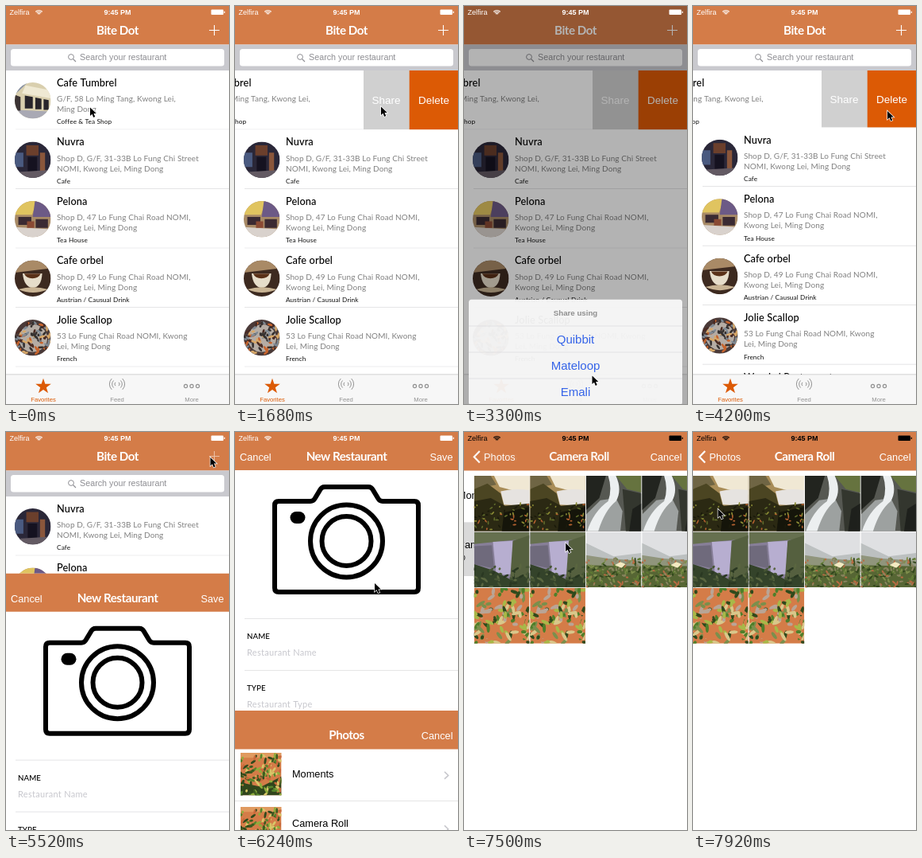
Write an HTML page with a canvas that moves like this. It is 281x500 px and loops after 8 s.

```html
<!DOCTYPE html>
<html lang="en">
<head>
<meta charset="utf-8">
<title>Restaurant list</title>
<style>
  html, body { margin: 0; width: 100%; height: 100%; overflow: hidden; background: #fff; }
  canvas { display: block; width: 281px; height: 500px; }
</style>
</head>
<body>
<canvas id="stage"></canvas>
<script>
const W = 281, H = 500, LOOP = 8000, STEP = 60;
const ROW = 74.5, LIST_TOP = 81, OPEN = 119;
const ORANGE = '#d47c48', ACCENT = '#dc5a05', LINE = '#dcdcde';
const SANS = '"Liberation Sans", sans-serif', LATO = 'Lato, sans-serif';

const canvas = document.getElementById('stage');
const g = canvas.getContext('2d');
const dpr = window.devicePixelRatio || 1;
canvas.width = W * dpr;
canvas.height = H * dpr;

const rows = [
  ['Cafe Tumbrel', 'G/F, 58 Lo Ming Tang, Kwong Lei,', 'Ming Dong', 'Coffee & Tea Shop', 'house'],
  ['Nuvra', 'Shop D, G/F, 31-33B Lo Fung Chi Street', 'NOMI, Kwong Lei, Ming Dong', 'Cafe', 'alley'],
  ['Pelona', 'Shop D, 47 Lo Fung Chai Road NOMI,', 'Kwong Lei, Ming Dong', 'Tea House', 'market'],
  ['Cafe orbel', 'Shop D, 49 Lo Fung Chai Road NOMI,', 'Kwong Lei, Ming Dong', 'Austrian / Causual Drink', 'cup'],
  ['Jolie Scallop', '53 Lo Fung Chai Road NOMI, Kwong', 'Lei, Ming Dong', 'French', 'plate'],
  ['Wun Lai Restaurant', 'Shop J, 61 Mei Song Road NOMI,', 'Kwong Lei, Ming Dong', 'Bakery', 'bread']
];

// Shapes live in a 100 x 100 box; leaves: count, top, bottom, size, colours.
const scenes = {
  house: { bg: '#d9cfae', shapes: [['#8791a6', 'M0 0H36L0 34Z'], ['#efe9d3', 'M30 8L100 22V44L20 30Z'],
    ['#27242a', 'M28 36L50 40V72H28ZM57 42L74 45V74H57ZM80 46L94 49V76H80Z'], ['#a9a9b4', 'M0 76L100 80V100H0Z'], ['#3c3434', 'M0 34L16 40V78H0Z']] },
  alley: { bg: '#2a2738', shapes: [['#4a5a80', 'M0 30H24V70H0Z'], ['#6b3f2c', 'M32 10H66V38H32Z'],
    ['#151220', 'M36 42H62V92H36Z'], ['#8a563b', 'M70 30H84V86H70Z'], ['#635a63', 'M0 84L100 78V100H0Z']] },
  market: { bg: '#a88a66', shapes: [['#e0c460', 'M0 0H62L48 38H0Z'], ['#6c5a86', 'M56 0H100V44H50Z'],
    ['#3a2a32', 'M10 44H46V66H10ZM58 50H92V74H58Z'], ['#d9d2cd', 'M0 72L100 78V100H0Z'], ['#8a4a34', 'M34 56H54V74H34Z']] },
  cup: { bg: '#3d2a20', shapes: [['#a98a66', 'M0 0H100V22L0 34Z'], ['#e6ddca', 'M22 36H76Q74 74 50 76Q26 74 22 36Z'],
    ['#5a3118', 'M26 37H72Q66 50 49 50Q32 50 26 37Z'], ['#c9b494', 'M10 80Q50 68 92 80Q50 98 10 80Z']] },
  plate: { bg: '#4a3a38', shapes: [['#b5aca4', 'M10 50Q20 10 60 14Q98 30 88 66Q70 96 36 88Q12 76 10 50Z']],
    leaves: [90, 8, 94, 6, '#c8642c', '#4b2b22', '#d8a868', '#7f8a94', '#35302f'] },
  bread: { bg: '#6a4630', shapes: [['#e3bb78', 'M12 60Q30 20 60 30Q94 40 86 70Q50 90 12 60Z'], ['#b4722f', 'M24 56Q44 36 76 54Q56 66 24 56Z']] },
  falls: { bg: '#a98d58', shapes: [['#f0e8d4', 'M36 0H100V34L46 20Z'], ['#6f6544', 'M0 0H30L40 16L0 24Z'], ['#4b4522', 'M0 24L24 14L48 32L54 54H0Z'],
    ['#e6e3e0', 'M48 28Q70 22 100 26V54L54 52Z'], ['#2b2913', 'M0 46L30 40L56 54L100 50V100H0Z'], ['#15150a', 'M54 66L100 56V100H50Z']],
    leaves: [60, 50, 98, 2.6, '#b2602f', '#5f6a2a', '#8a8a34', '#1a1a0b'] },
  stream: { bg: '#565852', shapes: [['#22241f', 'M0 0H36L24 40L0 62Z'], ['#66733f', 'M54 0H100V30L74 24Z'], ['#33362e', 'M66 24L100 32V100H72Z'],
    ['#9da1a0', 'M0 70L26 44L54 40L66 64L62 100H0Z'], ['#eceff0', 'M40 0H54Q66 26 54 46Q34 62 22 100H2Q14 64 40 46Q48 24 40 0Z'], ['#1e201c', 'M84 60L100 50V100H78Z']] },
  violet: { bg: '#877f98', shapes: [['#66704f', 'M0 0H100V12L56 16L0 22Z'], ['#6f6a7c', 'M0 26L32 24L36 66L0 58Z'], ['#b7aed0', 'M34 18L70 16L68 76L40 78Z'],
    ['#55603f', 'M70 16L100 6V100H64Z'], ['#34432a', 'M0 58L36 70L66 86L100 74V100H0Z']],
    leaves: [40, 62, 100, 4, '#2a3822', '#465534', '#5a6640'] },
  meadow: { bg: '#dfe0e2', shapes: [['#bcc0c0', 'M0 20L50 44L100 38V60H0Z'], ['#90957c', 'M0 42L40 48L100 52V72H0Z'], ['#566634', 'M0 60L100 62V100H0Z']],
    leaves: [150, 48, 100, 3, '#b86a42', '#7f8f4c', '#31461c', '#5f7a34', '#8a8460'], top: [['#f3eac2', 'M52 60L62 54L72 58L64 65Z']] },
  plants: { bg: ORANGE, leaves: [110, 0, 100, 6, '#4f7f2a', '#2f4a1c', '#a8b848', '#d9c78a', ORANGE, '#7a8f4c', '#b9a596'], shapes: [] },
  trellis: { bg: ORANGE, shapes: [['#e09a60', 'M0 0H100V12H0Z'], ['#31451c', 'M0 70L50 80L100 56V100H0Z']],
    leaves: [120, 6, 100, 5.5, '#56852c', '#2f4a1c', '#8fae3c', '#d8c668', '#c9693c', '#3e5c20'] }
};
const album = ['falls', 'falls', 'stream', 'stream', 'violet', 'violet', 'meadow', 'meadow', 'plants', 'plants'];

// Pointer: time, x, y
const pointerKeys = [
  [60, 106, 127.5], [360, 160, 125], [600, 160, 125], [1140, 50, 127], [1290, 50, 127], [1680, 184, 126.5],
  [2340, 184, 126.5], [2880, 165, 469], [3000, 161.5, 464.5], [3420, 161.5, 464.5], [3960, 245, 132],
  [4500, 245, 132], [4980, 258, 34], [5040, 257.5, 32], [5640, 257.5, 32], [6060, 176, 190],
  [6540, 176, 190], [7020, 132.5, 141.5], [7440, 132.5, 141.5], [7920, 31.5, 97]
];

function ease(t, from, to) {
  const p = Math.min(1, Math.max(0, (t - from) / (to - from)));
  return p * p * (3 - 2 * p);
}

// Critically damped spring from 0 to 1
function spring(t, start, rate) {
  const x = Math.max(0, t - start) * rate / 1000;
  return 1 - (1 + x) * Math.exp(-x);
}

function pointerAt(t) {
  let [, x, y] = pointerKeys[0];
  for (let i = 1; i < pointerKeys.length; i++) {
    const [from, x0, y0] = pointerKeys[i - 1], [to, x1, y1] = pointerKeys[i];
    if (t < from) break;
    const p = ease(t, from, to);
    x = x0 + (x1 - x0) * p;
    y = y0 + (y1 - y0) * p;
  }
  return { x, y };
}

function group(draw, x = 0, y = 0, alpha = 1) {
  g.save();
  g.translate(x, y);
  g.globalAlpha *= alpha;
  draw();
  g.restore();
}

function rect(x, y, w, h, color, radius = 0) {
  g.fillStyle = color;
  g.beginPath();
  g.roundRect(x, y, w, h, radius);
  g.fill();
}

function stroke(path, color, width) {
  g.strokeStyle = color;
  g.lineWidth = width;
  g.stroke(new Path2D(path));
}

function ring(x, y, r, color, width, from = 0, to = 2 * Math.PI) {
  g.strokeStyle = color;
  g.lineWidth = width;
  g.beginPath();
  g.arc(x, y, r, from, to);
  g.stroke();
}

// y is the middle of the capitals
function text(str, x, y, size, color, { font = SANS, weight = 400, align = 'left', spacing = 0 } = {}) {
  g.font = `${weight} ${size}px ${font}`;
  g.letterSpacing = spacing + 'px';
  g.textAlign = align;
  g.fillStyle = color;
  g.fillText(str, x, y + size * 0.36);
}

function photo(name, x, y, w, h, radius = 0) {
  const { bg, shapes, leaves, top = [] } = scenes[name];
  const paint = ([color, path]) => { g.fillStyle = color; g.fill(new Path2D(path)); };
  group(() => {
    g.beginPath();
    g.roundRect(0, 0, w, h, radius);
    g.clip();
    g.scale(w / 100, h / 100);
    rect(0, 0, 100, 100, bg);
    shapes.forEach(paint);
    if (leaves) {
      const [count, y0, y1, size, ...colors] = leaves;
      let seed = 77;
      const random = () => (seed = seed * 16807 % 2147483647) / 2147483647;
      for (let i = 0; i < count; i++) {
        g.fillStyle = colors[i % colors.length];
        g.beginPath();
        g.ellipse(random() * 100, y0 + random() * (y1 - y0), size * (0.6 + random()), size * 0.5, random() * 3.1, 0, 7);
        g.fill();
      }
    }
    top.forEach(paint);
  }, x, y);
}

function navTitle(str) {
  text(str, 140.5, 30.5, 15.2, '#fff', { font: LATO, weight: 700, align: 'center', spacing: -0.5 });
}

function navButton(str, x, align = 'left') {
  text(str, x, 31.5, 12.75, '#fff', { align });
}

function statusBar(color) {
  text('Zelfira', 4.5, 8, 9, color);
  for (const r of [2, 4, 6]) ring(41.5, 11.5, r, color, 1.2, -2.35, -0.8);
  text('9:45 PM', 140.5, 8, 9, color, { weight: 700, align: 'center' });
  rect(258.5, 4.5, 15.5, 6.5, color, 1);
  rect(274.7, 6.5, 1.2, 2.6, color, 0.5);
}

function rowContent([name, line1, line2, kind, picture], x) {
  group(() => {
    rect(0, 0, W, ROW, '#fff');
    photo(picture, 11, 15, 45.5, 45.5, 22.75);
    text(name, 64, 15.4, 12.75, '#000', { font: LATO, weight: 500, spacing: 0.1 });
    text(line1, 64, 35.5, 10, '#808080', { font: LATO, spacing: 0.1 });
    text(line2, 64, 48.5, 10, '#808080', { font: LATO, spacing: 0.1 });
    text(kind, 64, 64.5, 8.3, '#111', { font: LATO, spacing: 0.1 });
    rect(12, ROW - 0.8, W - 12, 0.8, LINE);
  }, x);
}

function swipedRow(offset, height) {
  const shown = Math.min(-offset, OPEN);
  group(() => {
    g.beginPath();
    g.rect(0, 0, W, height);
    g.clip();
    rect(0, 0, W, height, '#fff');
    rowContent(rows[0], offset);
    const share = W - shown, del = W - shown * 0.515;
    rect(share, 0, shown, height, '#d0d0d0');
    text('Share', share + 10.5, height / 2, 13.5, '#fff');
    rect(del, 0, W - del, height, ACCENT);
    text('Delete', del + 11.3, height / 2, 13.5, '#fff');
  }, 0, LIST_TOP);
}

function tabBar() {
  rect(0, 463, W, 37, '#f7f7f7');
  rect(0, 462.5, W, 0.8, '#c4c4c4');
  g.fillStyle = ACCENT;
  g.beginPath();
  for (let i = 0; i < 10; i++) {
    const r = i % 2 ? 4 : 10.3, a = Math.PI * (i / 5 - 0.5);
    g.lineTo(47 + r * Math.cos(a), 478 + r * Math.sin(a));
  }
  g.fill();
  for (const r of [3, 6.3, 9.6]) {
    ring(140, 475, r, '#929292', 1, -0.8, 0.8);
    ring(140, 475, r, '#929292', 1, Math.PI - 0.8, Math.PI + 0.8);
  }
  for (const x of [226.5, 234, 241.5]) ring(x, 477.5, 2.1, '#929292', 1.2);
  text('Favorites', 47, 494.5, 7.7, ACCENT, { align: 'center' });
  text('Feed', 140, 494.5, 7.7, '#929292', { align: 'center' });
  text('More', 234, 494.5, 7.7, '#929292', { align: 'center' });
}

function listScreen(t, pointer) {
  const gone = ease(t, 4160, 4500);
  const drag = t < 600 ? 0 : t < 1140 ? pointer.x - 160 : -110 - 9 * ease(t, 1140, 1500);
  rect(0, 0, W, H, '#fff');
  if (gone < 1) swipedRow(drag - 162 * gone, ROW * (1 - gone));
  rows.forEach((row, i) => {
    if (i) group(() => rowContent(row, 0), 0, LIST_TOP + ROW * (i - gone));
  });
  tabBar();
  rect(0, 0, W, 48.5, ORANGE);
  navTitle('Bite Dot');
  group(() => stroke('M256 30.5H269M262.5 24V37', '#fff', 1.1), 0, 0, t >= 5280 ? 0.5 : 1);
  rect(0, 48.5, W, 32.5, '#c9c9ce');
  rect(6, 54, 269, 21.5, '#fff', 3.5);
  ring(82, 64, 3.4, '#8e8e93', 1);
  stroke('M84.5 66.5L88 70', '#8e8e93', 1.1);
  text('Search your restaurant', 93, 64.5, 10.75, '#8e8e93');
}

function actionSheet(t) {
  const up = spring(t, 2060, 24) - ease(t, 3210, 3480);
  if (up <= 0) return;
  rect(0, 0, W, H, `rgba(0,0,0,${0.4 * up})`);
  group(() => {
    rect(6, 322.5, 269, 132.5, 'rgba(248,248,248,.95)', 3.5);
    text('Share using', 140.5, 339.5, 9.7, '#8f8f8f', { weight: 700, align: 'center' });
    ['Quibbit', 'Mateloop', 'Emali'].forEach((label, i) => {
      rect(6, 355.5 + 33 * i, 269, 0.7, '#cfcfd2');
      text(label, 140.5, 372.5 + 33 * i, 15, '#3564e8', { align: 'center' });
    });
    rect(6, 461, 269, 33, t >= 3180 ? '#e6e6e6' : '#fff', 3.5);
    text('Cancel', 140.5, 477.5, 15, '#3564e8', { weight: 700, align: 'center' });
  }, 0, 178 * (1 - up));
}

function formScreen() {
  rect(0, 0, W, H, '#fff');
  rect(0, 0, W, 48, ORANGE);
  navButton('Cancel', 6);
  navTitle('New Restaurant');
  navButton('Save', 274.5, 'right');
  stroke('M55 87H95Q99 87 101 83L107 73Q109 69 113 69H168Q172 69 174 73L180 83Q182 87 186 87H226Q231 87 231 92V196Q231 201 226 201H55Q50 201 50 196V92Q50 87 55 87Z', '#000', 6);
  ring(140.5, 137, 45.5, '#000', 6);
  ring(140.5, 137, 31, '#000', 6);
  rect(69.5, 100, 19, 15, '#000', 7.5);
  ['Name', 'Type', 'Location'].forEach((label, i) => {
    const y = 234 + 65 * i;
    rect(12, y, W - 12, 0.8, LINE);
    text(label.toUpperCase(), 15, y + 22.5, 9.7, '#000', { font: LATO, weight: 500, spacing: 0.1 });
    text('Restaurant ' + label, 15, y + 43.5, 11, '#c7c7cd', { font: LATO, spacing: 0.3 });
  });
  rect(12, 429, W - 12, 0.8, LINE);
}

function albumList(t) {
  rect(0, 48, W, H, '#fff');
  if (t >= 7200) rect(0, 114, W, 67, '#d9d9d9');
  photo('trellis', 7, 53, 51.5, 53.5);
  photo('trellis', 7, 121, 51.5, 53);
  rect(9.5, 159.5, 11, 9, '#d8d8d8');
  rect(11.5, 161.5, 11, 9.5, '#fff');
  text('Moments', 72, 79.5, 12.75, '#000');
  text('Camera Roll', 72, 141.5, 12.75, '#000');
  text('10', 72, 158, 9, '#000');
  rect(0, 113, W, 0.8, LINE);
  for (const y of [81.5, 149]) stroke(`M264 ${y - 4.5}L268.8 ${y}L264 ${y + 4.5}`, '#c7c7cc', 1.5);
}

function photoGrid() {
  rect(0, 48, W, H, '#fff');
  album.forEach((name, i) => photo(name, 70.5 * (i % 4), 55 + 70.5 * Math.floor(i / 4), 69.7, 69.7));
}

function pickerScreen(t) {
  const push = spring(t, 7230, 18);
  group(() => albumList(t), -84 * push);
  if (push > 0) group(photoGrid, W * (1 - push));
  rect(0, 0, W, 48.5, ORANGE);
  group(() => navTitle('Photos'), -100 * push, 0, 1 - push);
  group(() => {
    navTitle('Camera Roll');
    navButton('Photos', 20.5);
    stroke('M15.2 24L8.2 31.3L15.2 38.6', '#fff', 2.2);
  }, 100 * (1 - push), 0, push);
  navButton('Cancel', 274.5, 'right');
}

function arrow({ x, y }) {
  group(() => {
    const shape = new Path2D('M0 0V10.5L2.5 8.3L4.3 12.4L6.2 11.6L4.5 7.6H7.8Z');
    g.lineWidth = 1.4;
    g.strokeStyle = '#fff';
    g.stroke(shape);
    g.fillStyle = '#000';
    g.fill(shape);
  }, x, y);
}

function draw(t) {
  const pointer = pointerAt(t);
  const form = spring(t, 5400, 18.3), picker = spring(t, 6180, 18.3);
  g.setTransform(dpr, 0, 0, dpr, 0, 0);
  listScreen(t, pointer);
  actionSheet(t);
  if (form > 0) group(formScreen, 0, H * (1 - form));
  if (picker > 0) group(() => pickerScreen(t), 0, H * (1 - picker));
  statusBar(t >= 7320 ? '#000' : '#fff');
  arrow(pointer);
}

let shown = -1;
function tick() {
  const t = Math.floor(performance.now() % LOOP / STEP) * STEP;
  if (t !== shown) draw(shown = t);
  requestAnimationFrame(tick);
}
tick();
</script>
</body>
</html>
```
